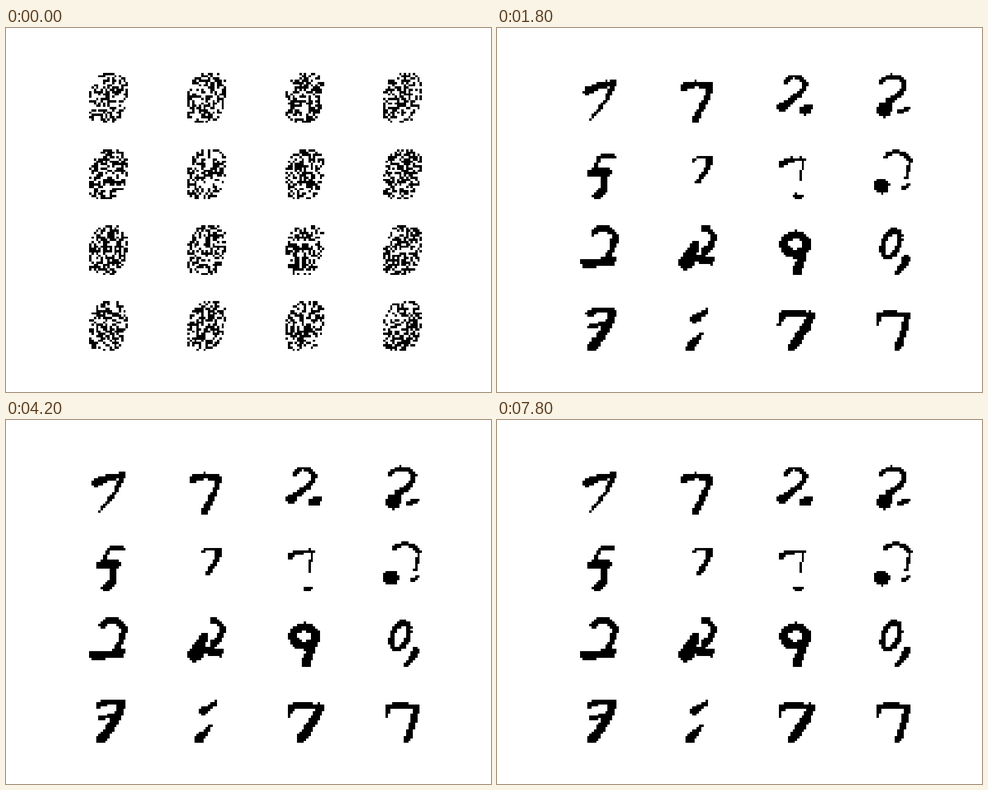
A matplotlib script for the animation above (8 s loop, 800x600 px).

```python
import numpy as np
import matplotlib.pyplot as plt
from matplotlib.animation import FuncAnimation

SIZE = 28
STEP_MS = 200
FRAMES = 40
HOLD = 4          # extra frames the opening noise stays
REACH = 1.6       # strokes stop pulling beyond this distance

rows, cols = np.mgrid[:SIZE, :SIZE].astype(float)

# leaning egg in which cells are active
u = (cols - 13.8 + 0.15 * (rows - 14.5)) / 8.3
v = (rows - 14.5) / 11
mask = np.abs(u) ** 2.8 + np.abs(v) ** 2.8 < 1


def ink(x, y, width):
    """Signed depth inside a chain of round dabs."""
    dabs = np.broadcast(x, y, width)
    return np.max([w / 2 - np.hypot(cols - a, rows - b) for a, b, w in dabs], axis=0)


def brush(start, bend, end, w0, w1=None):
    """Quadratic curve whose width runs from w0 to w1."""
    t = np.linspace(0, 1, 40)
    x, y = [(1 - t) ** 2 * a + 2 * t * (1 - t) * b + t * t * c
            for a, b, c in zip(start, bend, end)]
    return ink(x, y, w0 + ((w0 if w1 is None else w1) - w0) * t)


def line(start, end, w0, w1=None):
    return brush(start, np.add(start, end) / 2, end, w0, w1)


def ring(x, y, rx, ry, width, lean=0.0):
    a = np.linspace(0, 2 * np.pi, 60)
    return ink(x + rx * np.cos(a) - lean * ry * np.sin(a), y + ry * np.sin(a), width)


def join(*parts):
    return np.max(parts, axis=0)


def two(hook, knee, neck, foot, tail, hook_w=2.1, neck_w=3, foot_w=6.8, tail_w=2):
    top = (knee, 8)
    return join(brush(hook, (knee - 5, 2.2), top, hook_w),
                brush(top, (knee, 12), neck, hook_w, neck_w),
                line(foot, foot, foot_w),
                line(tail, (20.5, 19.3), tail_w))


def seven(bar, corner, end, bar_w, stem_w, end_w, drop=0):
    x, y = bar
    return join(brush(bar, (x + 4, y - 2.5), corner, bar_w, 0.65 * bar_w),
                brush(corner, (corner[0] - 1, 14), end, stem_w, end_w),
                line(bar, (x - 0.4, y + drop), 1.8))


def nine(loop, stem, end, stem_w, end_w):
    return join(loop, line(stem, end, stem_w, end_w))


shapes = [
    ("7", seven((8.6, 11.6), (20, 8), (10, 24), 3.8, 2.8, 1.2)),
    ("7", seven((7.5, 10), (19.5, 9.3), (12.6, 24.5), 3.7, 2.4, 3)),
    ("2", two((9, 7.8), 18, (9, 17.5), (8, 18.4), (17, 20), foot_w=4.6, tail_w=4)),
    ("2", two((7.5, 8), 19, (12, 16), (10, 19.5), (16, 20.5))),

    ("9", join(nine(brush((20, 7), (13, 4.5), (12.5, 12), 2), (16.5, 13), (16, 20), 3.2, 3.2),
               line((10, 14), (17.5, 13.4), 3.8), line((16, 21), (13, 24), 3, 4))),
    ("7", seven((12.5, 8), (19.2, 7.8), (14, 17.5), 1.6, 2.5, 2.2)),
    ("7", join(seven((7, 10), (17.3, 8), (15.5, 17), 2.6, 1.2, 1.2),
               line((14.3, 24.4), (16.2, 24.4), 2.6))),
    ("2", two((10.5, 6.5), 21, (19.5, 16), (8.8, 19.5), (18, 21), 1.9, 1.4, tail_w=1.6)),

    ("2", two((11.5, 6.8), 20.8, (17.5, 18), (7.5, 20), (8, 20.6), 3, 2.6, 4, 3.6)),
    ("2", join(two((17, 5.5), 21, (17, 15), (8.7, 20), (12, 18), 2.6, 3, 6.4, 3.5),
               line((9, 20), (13, 12), 6.4, 3.6))),
    ("9", nine(ring(13.6, 12, 4.8, 4.1, 3.8), (18.8, 11), (14.5, 24), 3.4, 4.2)),
    ("9", nine(ring(13, 11.8, 3.6, 5.8, 2.4, 0.25), (20, 18.6), (15.8, 24.6), 3.8, 2)),

    ("7", join(seven((9.5, 9), (20, 8.2), (10.5, 24), 3, 3.4, 4.2),
               line((10, 14.8), (17, 13), 1.8))),
    ("9", nine(line((12.5, 11.8), (18, 7.8), 3.6, 1.6), (15.5, 18), (10.5, 24), 1.6, 4)),
    ("7", seven((7.2, 10.3), (20.5, 9.8), (12.2, 23.8), 3.4, 3.8, 4.2, drop=3)),
    ("7", seven((7.5, 10.2), (20.2, 9.8), (16.2, 24), 3, 2.8, 3.2, drop=3)),
]

kinds = [kind for kind, _ in shapes]
late = np.clip([depth for _, depth in shapes], -3, 3)
# the first update still leans towards what all figures of a kind share
shared = {k: late[[other == k for other in kinds]].mean(axis=0) for k in set(kinds)}
early = 0.7 * late + 0.3 * np.array([shared[k] for k in kinds])

start = np.random.default_rng(5).uniform(-1, 1, late.shape)


def grid(step):
    """All sixteen patterns after the given number of updates."""
    if step == 0:
        return (start > 0) & mask
    mix = min((step - 1) / 4, 1) ** 0.7
    pull = np.clip((1 - mix) * early + mix * late, -REACH, REACH)
    fresh = np.random.default_rng(100 + step).uniform(-1, 1, start.shape)
    heat = 0.12 + 1.35 * np.exp(-(step - 1) / 1.5)
    return (pull + heat * start + 0.04 * fresh > 0) & mask


fig, axes = plt.subplots(4, 4, figsize=(8, 6), dpi=100, facecolor="white")
fig.subplots_adjust(left=0.125, right=0.9, bottom=0.1, top=0.9,
                    wspace=0.2, hspace=0.2)
images = []
for ax in axes.flat:
    ax.axis("off")
    images.append(ax.imshow(np.zeros((SIZE, SIZE)), cmap="gray_r", vmin=0, vmax=1,
                            interpolation="nearest"))


def update(frame):
    for image, pattern in zip(images, grid(max(0, frame - HOLD))):
        image.set_data(pattern.astype(float))
    return images


anim = FuncAnimation(fig, update, frames=FRAMES, init_func=lambda: update(0),
                     interval=STEP_MS, repeat=True, repeat_delay=0, blit=False)
plt.show()
```
